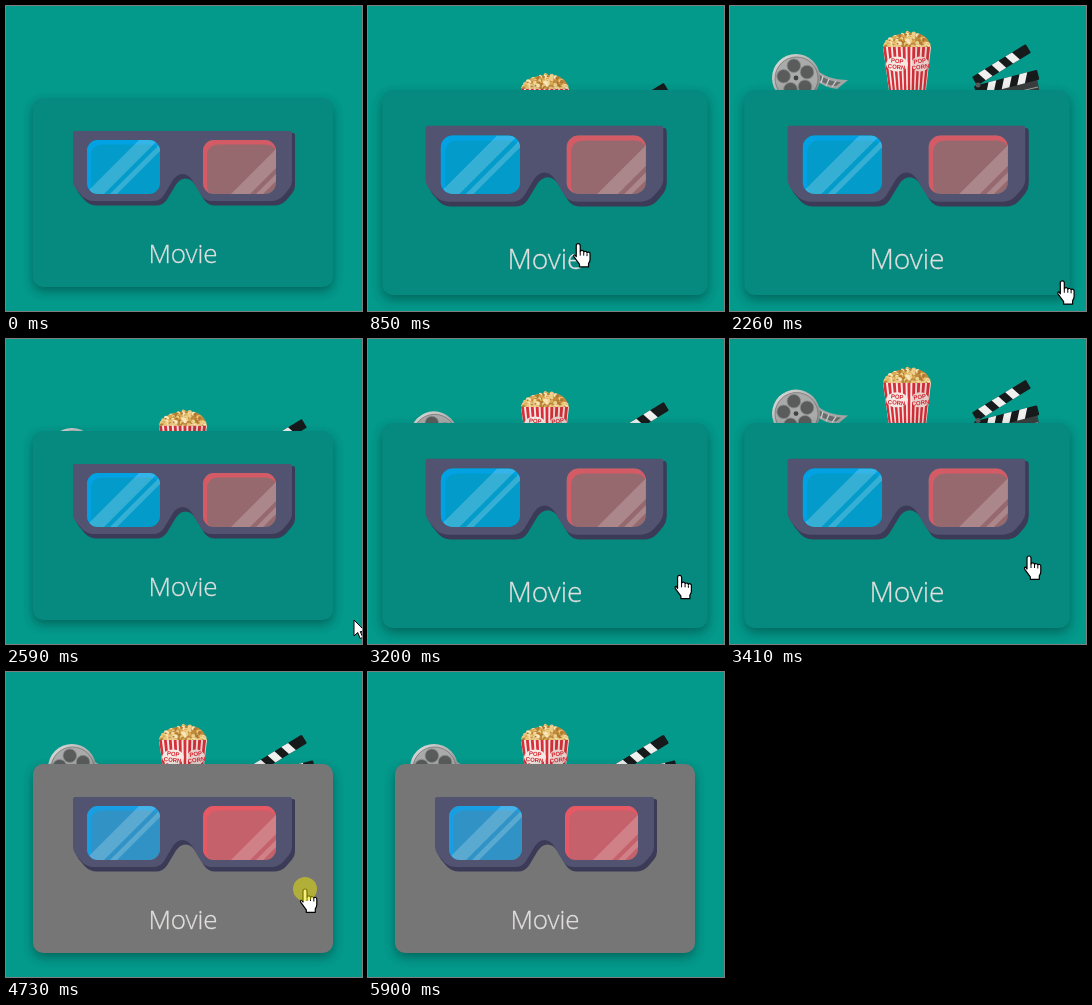
An HTML page for the animation above (5.94 s loop, 356 px wide and 305 px high).

```html
<!DOCTYPE html>
<html lang="en">
<head>
<meta charset="utf-8">
<title>Movie card</title>
<style>
  html, body { margin: 0; width: 100%; height: 100%; overflow: hidden; background: #03998b; }
  svg { display: block; width: 100vw; height: 100vh; }
  .title { font: 300 26px "Open Sans", "Noto Sans", sans-serif; fill: #e2dfdf; stroke: #e2dfdf; stroke-width: .3; text-anchor: middle; }
  .label { font: 700 6px "Liberation Sans", Arial, sans-serif; fill: #d3242f; text-anchor: middle; }
</style>
</head>
<body>
<svg viewBox="0 0 356 305">
  <defs>
    <filter id="soft" x="-20%" y="-20%" width="140%" height="150%"><feGaussianBlur stdDeviation="5.5"/></filter>
    <linearGradient id="metal" x1="0" y1="0" x2="1" y2="1">
      <stop offset="0" stop-color="#e4e3e1"/><stop offset="1" stop-color="#777979"/>
    </linearGradient>
    <path id="frame" d="M69 125H284Q286 125 286 127V175Q286 179 283 183L277 190Q272 195 265 195H206Q199 195 195 189L186 174Q182 168 176.500 168T167 174L158 189Q154 195 147 195H88Q81 195 76 190L70 183Q67 179 67 175V127Q67 125 69 125Z"/>
    <rect id="lens" width="73" height="54" rx="11"/>
    <path id="rim" fill-rule="evenodd" d="M11 0H62A11 11 0 0 1 73 11V43A11 11 0 0 1 62 54H11A11 11 0 0 1 0 43V11A11 11 0 0 1 11 0ZM16 4.500Q4 4.500 4 16.500V45Q4 54 11 54H62A11 11 0 0 0 73 43V14.500Q73 4.500 62 4.500Z"/>
    <clipPath id="glass"><use href="#lens"/></clipPath>
    <mask id="holes" maskUnits="userSpaceOnUse" x="50" y="110" width="260" height="110">
      <rect x="50" y="110" width="260" height="110" fill="#fff"/>
      <use href="#lens" x="81" y="134"/><use href="#lens" x="197" y="134"/>
    </mask>
    <path id="glare" d="M0 54H19L73 0H54ZM25 54H32L86 0H79Z" fill="#fff" opacity=".2"/>
    <clipPath id="bucket"><path d="M153 41H201L195 92H160Z"/></clipPath>
  </defs>

  <rect width="356" height="305" fill="#03998b"/>

  <g id="reel">
    <path d="M85 62Q96 74 118 74L107 83Q93 81 86 74Z" fill="#a4a6a5"/>
    <path d="M87 67Q98 76 111 76L106 80Q95 79 88 73Z" fill="#686d6e"/>
    <path d="M93 70L91 77M99 73L96 80M106 75L102 81" stroke="#cfcfcc" stroke-width="1.300"/>
    <circle cx="66" cy="72" r="24" fill="url(#metal)"/>
    <circle cx="66.500" cy="72.500" r="21.500" fill="#a9aaa9" stroke="#757777" stroke-width=".8"/>
    <g id="holesRing" fill="#5a5c5c" stroke="#8b8d8d" stroke-width=".8"></g>
    <circle cx="66" cy="72" r="2.400" fill="#3f4345"/>
  </g>

  <g id="popcorn">
    <path d="M153 44Q154 29 177 27T201 44Z" fill="#c08a3e"/>
    <g id="kernels"></g>
    <g clip-path="url(#bucket)">
      <rect x="150" y="40" width="54" height="54" fill="#f6e9e4"/>
      <g id="stripes" fill="#d8303a"></g>
      <g fill="#f6e9e4"><ellipse cx="167" cy="58" rx="11" ry="7.500"/><ellipse cx="190" cy="58" rx="9" ry="7.500"/></g>
      <path d="M183 41L180 92H202V41Z" fill="#7a2020" opacity=".13"/>
    </g>
    <g class="label">
      <text x="167" y="57" transform="rotate(6 167 57)">POP</text><text x="167" y="63" transform="rotate(6 167 57)">CORN</text>
      <text x="190" y="57" transform="rotate(-8 190 57)">POP</text><text x="190" y="63" transform="rotate(-8 190 57)">CORN</text>
    </g>
  </g>

  <g id="clapper">
    <path d="M248 87L307 72L313 104H253Z" fill="#3a3d3e"/>
    <path d="M262 92L308 81M264 97H310" stroke="#9da3a4" stroke-width="1"/>
    <g id="topStick" transform="translate(242 71) rotate(-31.500)"></g>
    <g id="lowStick" transform="translate(244 80) rotate(-14.500)"></g>
    <circle cx="248" cy="79" r="2.500" fill="#55595a"/>
  </g>

  <g id="card">
    <rect x="27" y="97" width="300" height="188" rx="10" fill="#002b28" opacity=".48" filter="url(#soft)"/>
    <rect id="face" x="27" y="92" width="300" height="189" rx="10"/>
    <g mask="url(#holes)">
      <g fill="#3b3a57"><use href="#frame" x="3" y="2"/><use href="#frame" x="3" y="4.500"/></g>
      <use href="#frame" fill="#525370"/>
    </g>
    <g transform="translate(81 134)" fill="#00a9ff">
      <use href="#lens" opacity=".58"/><use href="#rim" opacity=".5"/>
      <g clip-path="url(#glass)"><use href="#glare" x="-2"/></g>
    </g>
    <g transform="translate(197 134)" fill="#fd5362">
      <use href="#lens" opacity=".58"/><use href="#rim" opacity=".6"/>
      <g clip-path="url(#glass)"><use href="#glare" x="28"/></g>
    </g>
    <text class="title" x="177" y="257">Movie</text>
  </g>

  <g id="cursor" fill="#fff" stroke="#000" stroke-linejoin="round">
    <g id="hand">
      <path d="M-2 13V2a2 2 0 0 1 4 0v6a1.8 1.8 0 0 1 3.5 .5a1.8 1.8 0 0 1 3.3 .8a1.6 1.6 0 0 1 3 1v5.5q0 2-1.5 4v3.5h-9v-2.5l-5.5-7.5q-1-2 1-2.2z" stroke-width="1.200"/>
      <path d="M2 8v4M5.5 9v3M8.8 10v2.5" fill="none"/>
    </g>
    <path id="arrow" d="M0 0v16l3.7-3.5 2.5 6 2.6-1.1-2.5-5.8h5.2z"/>
  </g>
  <circle id="press" cx="299" cy="217" r="12" fill="#f0e600" opacity=".5"/>
</svg>

<script>
const LOOP = 5940;
const $ = id => document.getElementById(id);
const lerp = (a, b, p) => a + (b - a) * p;
const clamp = p => Math.min(1, Math.max(0, p));

function add(parent, tag, attrs) {
  const el = document.createElementNS('http://www.w3.org/2000/svg', tag);
  for (const k in attrs) el.setAttribute(k, attrs[k]);
  $(parent).append(el);
}

// CSS "ease" curve: cubic-bezier(.25, .1, .25, 1)
function ease(p) {
  if (p <= 0 || p >= 1) return clamp(p);
  const bez = (a, b, s) => 3 * a * s * (1 - s) ** 2 + 3 * b * s * s * (1 - s) + s ** 3;
  let lo = 0, hi = 1;
  for (let i = 0; i < 20; i++) {
    const mid = (lo + hi) / 2;
    if (bez(.25, .25, mid) < p) lo = mid; else hi = mid;
  }
  return bez(.1, 1, lo);
}

// Eased value after a list of [time, target] changes
function follow(t, start, changes, duration) {
  let v = start;
  for (const [at, to] of changes) if (t > at) v = lerp(v, to, ease((t - at) / duration));
  return v;
}

// Black bar with white slanted blocks
function stick(id, length, lean) {
  add(id, 'rect', { width: length, height: 10, rx: 1, fill: '#171a1b' });
  for (let x = 10; x < length - 9; x += 16) {
    add(id, 'path', { d: `M${x} 10l${lean}-10h8l${-lean} 10Z`, fill: '#f0f1ef' });
  }
}

function build() {
  for (let i = 0; i < 5; i++) {
    const a = (i * 72 - 100) * Math.PI / 180;
    add('holesRing', 'circle', { cx: 66 + 12.5 * Math.cos(a), cy: 72 + 12.5 * Math.sin(a), r: 6.8 });
  }

  let seed = 11;
  const rnd = () => (seed = seed * 16807 % 2147483647) / 2147483647;
  const tones = ['#ecd08a', '#d9a850', '#f8e6b8', '#b07a30', '#e8c47c'];
  const kernels = Array.from({ length: 150 }, (_, i) => {
    const u = rnd() * 2 - 1;
    return { cx: 177 + 22 * u, cy: lerp(26.5 + 11 * u * u, 43, rnd()), r: 1 + rnd() * 1.3, fill: tones[i % 5] };
  });
  kernels.sort((a, b) => a.cy - b.cy).forEach(k => add('kernels', 'circle', k));

  for (let i = 0; i < 10; i++) {
    const top = 153 + i * 4.9, low = 160 + i * 3.6;
    add('stripes', 'path', { d: `M${top} 41h2.9L${low + 2.1} 92h-2.1Z` });
  }

  stick('topStick', 63, -3);
  stick('lowStick', 65, 5);
}

// [time, x, y] of the pointer tip
const route = [
  [500, 213, 306], [1070, 208.5, 195], [1590, 208.5, 195], [2150, 328, 273],
  [2200, 329, 273.5], [2550, 348, 281], [2820, 348, 281], [2945, 327, 260],
  [3410, 299, 217], [5680, 299, 217], [5900, 318, 306]
];

function pointer(t) {
  for (let i = 1; i < route.length; i++) {
    const [t0, x0, y0] = route[i - 1], [t1, x1, y1] = route[i];
    if (t < t1) {
      const p = clamp((t - t0) / (t1 - t0));
      return [lerp(x0, x1, p), lerp(y0, y1, p)];
    }
  }
  return [318, 306];
}

// Vertical offset of each prop: [hidden, after the click]
const props = { reel: [90, 24], popcorn: [100, 27], clapper: [92, 24.5] };
const show = (id, on) => $(id).setAttribute('visibility', on ? 'visible' : 'hidden');

function draw(t) {
  for (const id in props) {
    const [hidden, clicked] = props[id];
    const y = follow(t, hidden, [[650, 0], [2428, hidden], [2940, 0], [4040, clicked]], 600);
    $(id).setAttribute('transform', `translate(0 ${y})`);
  }

  const grow = follow(t, 0, [[650, 1], [2420, 0], [2940, 1], [3955, 0]], 160);
  const scale = 1 + .085 * grow;
  $('card').setAttribute('transform', `translate(177 187) scale(${scale}) translate(-177 -187)`);

  const gray = ease((t - 4040) / 700);
  const rgb = [6, 137, 126].map((c, i) => Math.round(lerp(c, [117, 118, 117][i], gray)));
  $('face').setAttribute('fill', `rgb(${rgb})`);

  const [x, y] = pointer(t);
  const over = x < 177 + 150 * scale + .5 && y < 187 + 94 * scale;
  const active = t >= 500 && t < 5900;
  $('cursor').setAttribute('transform', `translate(${x} ${y})`);
  show('hand', active && over);
  show('arrow', active && !over);
  show('press', t >= 3970 && t < 5510);
}

function tick() {
  draw(performance.now() % LOOP);
  requestAnimationFrame(tick);
}

build();
tick();
</script>
</body>
</html>
```
